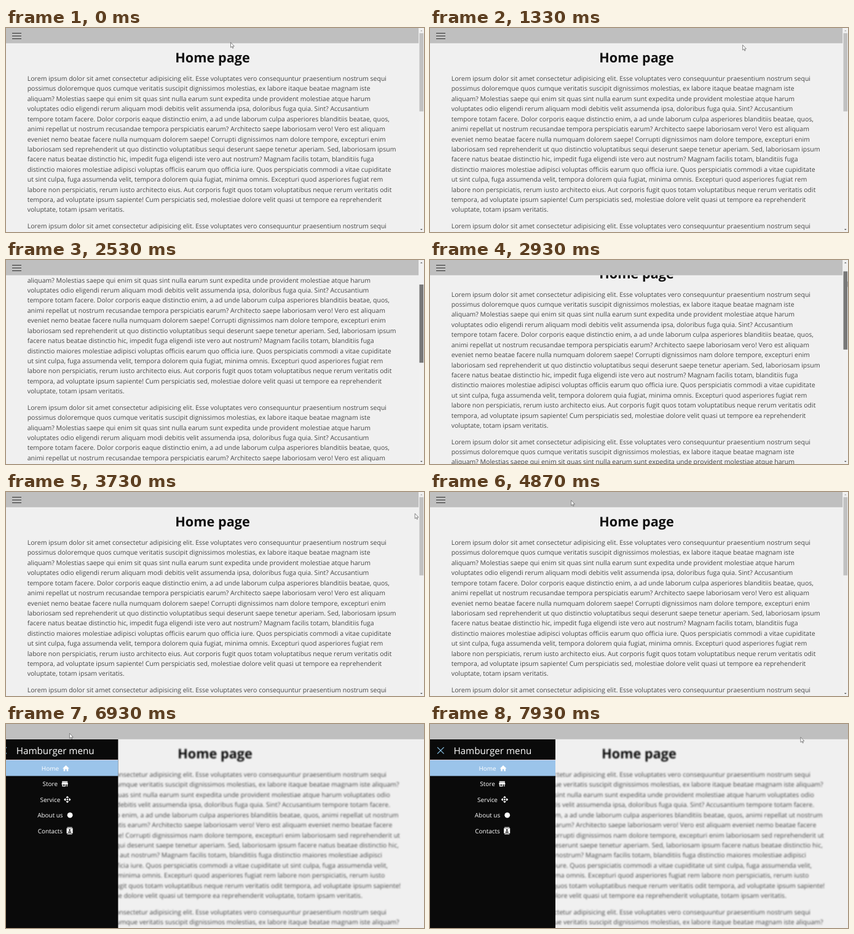
Write an HTML page that moves like this. It is 680 by 332 pixels and loops after 8 s.

```html
<!DOCTYPE html>
<html lang="en">
<head>
<meta charset="utf-8">
<title>Hamburger menu</title>
<style>
  html, body { margin: 0; width: 100%; height: 100%; overflow: hidden; background: #f0f0f0; }
  svg { display: block; width: 680px; height: 332px; }
  text { font-family: "Open Sans", "Noto Sans", sans-serif; font-kerning: none; text-rendering: geometricPrecision; }
  .copy { font-size: 10.5px; fill: #464646; }
  .head { font-size: 21.7px; font-weight: 700; fill: #111; text-anchor: middle; }
  .menu text { fill: #fff; font-size: 9.95px; }
  .menu .title { font-size: 15.2px; }
</style>
</head>
<body>
<svg viewBox="0 0 680 332">
  <defs>
    <filter id="soft" filterUnits="userSpaceOnUse" x="0" y="-10" width="690" height="360">
      <feGaussianBlur id="blur" stdDeviation="0"/>
    </filter>
  </defs>
  <rect width="680" height="332" fill="#f0f0f0"/>
  <g id="narrow"></g>
  <g id="wide" filter="url(#soft)"></g>
  <rect id="bar" height="24.8" fill="#bfbfbf"/>
  <path id="burger" d="M10 8.5h15m-15 4.5h15m-15 4.5h15" fill="none"/>

  <g id="scroll">
    <rect x="671.4" width="8.6" height="332" fill="#f1f1f1"/>
    <rect id="thumb" x="672.5" width="6.6" height="127.3"/>
    <path id="up" d="M674 5.3l1.8-1.9 1.8 1.9z"/>
    <path d="M674 327l1.8 1.9 1.8-1.9z" fill="#505050"/>
  </g>

  <g id="menu" class="menu">
    <rect y="25" width="204" height="307" fill="#0a0a0a"/>
    <path d="M12 37.8l10.6 10.6m0-10.6l-10.6 10.6" stroke="#8cc6ea" stroke-width="1.2"/>
    <text class="title" x="38.4" y="48.5">Hamburger menu</text>
    <rect y="58" width="204" height="1" fill="#d2c4cc"/>
    <rect y="59" width="204" height="25.6" fill="#9bc4ea"/>
    <g id="items"></g>
  </g>

  <g id="cursor" fill="#fff" stroke="#555" stroke-width=".7" stroke-linejoin="round">
    <path id="arrow" d="M0 0v8.3l1.9-1.7 1.3 2.9 1.2-.5-1.2-2.8h2.6z"/>
    <path id="hand" d="M-.9 5.6V.7a.9 .9 0 0 1 1.8 0v3.1l4 .9q1.1 .3 1 1.5l-1.3 5.6H.6l-3.3-4.4q-.6-1.3 .5-1.4z"/>
    <path id="beam" d="M-1.6-4h3.2M0-4v8M-1.6 4h3.2" stroke="#333"/>
  </g>
</svg>
<script>
const $ = id => document.getElementById(id);
const LOOP = 8000, FPS = 15, LINE = 16.42, GAP = 10.05;
const CLICK = 6725, HOVER = 5900;

// "|" breaks the line beside the scrollbar, "/" breaks it at full width.
const copy = `Lorem ipsum dolor sit amet consectetur adipisicing elit. Esse voluptates vero consequuntur praesentium nostrum sequi |/
possimus doloremque quos cumque veritatis suscipit dignissimos molestias, ex labore itaque beatae magnam iste |
aliquam? / Molestias saepe qui enim sit quas sint nulla earum sunt expedita unde provident molestiae atque harum |
voluptates odio / eligendi rerum aliquam modi debitis velit assumenda ipsa, doloribus fuga quia. Sint? Accusantium |
tempore totam facere. / Dolor corporis eaque distinctio enim, a ad unde laborum culpa asperiores blanditiis beatae, quos, |
animi repellat ut nostrum / recusandae tempora perspiciatis earum? Architecto saepe laboriosam vero! Vero est aliquam |
eveniet nemo beatae facere / nulla numquam dolorem saepe! Corrupti dignissimos nam dolore tempore, excepturi enim |
laboriosam sed reprehenderit ut / quo distinctio voluptatibus sequi deserunt saepe tenetur aperiam. Sed, laboriosam ipsum |
facere natus beatae distinctio hic, / impedit fuga eligendi iste vero aut nostrum? Magnam facilis totam, blanditiis fuga |
distinctio maiores molestiae adipisci / voluptas officiis earum quo officia iure. Quos perspiciatis commodi a vitae cupiditate |
ut sint culpa, fuga assumenda velit, / tempora dolorem quia fugiat, minima omnis. Excepturi quod asperiores fugiat rem |
labore non perspiciatis, rerum iusto / architecto eius. Aut corporis fugit quos totam voluptatibus neque rerum veritatis odit |
tempora, ad voluptate ipsum sapiente! / Cum perspiciatis sed, molestiae dolore velit quasi ut tempore ea reprehenderit |
voluptate, totam ipsam veritatis.`;

function page(mark, other, center) {
  const lines = copy.split(mark).map(s => s.replaceAll(other, '').replace(/\s+/g, ' ').trim());
  let out = `<text class="head" x="${center}" y="55.9">Home page</text>`;
  for (let p = 0, y = 86; p < 3; p++, y += GAP)
    for (const line of lines) {
      out += `<text class="copy" x="34.7" y="${y.toFixed(2)}">${line}</text>`;
      y += LINE;
    }
  return out;
}
$('narrow').innerHTML = page('|', '/', 336);
$('wide').innerHTML = page('/', '|', 340);

const icons = {
  'Home': '<path d="M-5.5 .5L0-4.8 5.5 .5H3.8V4.8H1.2V1.5H-1.2V4.8H-3.8V.5z"/>',
  'Store': '<path d="M-4.5-4.5h9v1.2h-9zM-4.5-2.7h9l.8 3.5h-10.6zM-4.3 0h5.6v4.4h-5.6zM3 0h1.2v4.4h-1.2z"/><path d="M-3 1h3v2h-3z" fill="#0a0a0a"/>',
  'Service': '<path d="M0-4.3L4.3 0 0 4.3-4.3 0z" fill="none" stroke="#fff" stroke-width="2" stroke-dasharray="4.4 1.68" stroke-dashoffset="2.2"/><circle r="1.3"/>',
  'About us': '<circle r="4.4"/>',
  'Contacts': '<path d="M-5-4.2h10v8.4h-10zM-4-6h8v1h-8zM-4 5h8v1h-8z"/><path d="M-2.8 3q0-2 2.8-2t2.8 2z" fill="#0a0a0a"/><circle cy="-1.2" r="1.4" fill="#0a0a0a"/>'
};
$('items').innerHTML = Object.entries(icons).map(([label, icon], i) =>
  `<g transform="translate(102 ${72 + i * 25.45})" fill="#fff"><text y="3.9">${label}</text><g>${icon}</g></g>`
).join('');

// Each row, label plus icon, is centred in the menu.
for (const row of $('items').children) {
  const [label, icon] = row.children;
  const width = label.getComputedTextLength();
  label.setAttribute('x', -(width + 17) / 2);
  icon.setAttribute('transform', `translate(${(width + 6) / 2} 0)`);
}

// Where the pointer turns: time, x, y.
const path = [
  [0, 365.5, 23.5], [470, 267, 58], [930, 307, 44], [1670, 677, 14],
  [2200, 677.5, 20], [2530, 681, 45], [3330, 679, 26], [3730, 665.5, 35],
  [3930, 652, 33], [4130, 670, 28], [5000, 150, 11], [5900, 17.5, 11.5],
  [6730, 17.5, 11.5], [7600, 385, 27], [7930, 603, 21.5]
];

function pointer(t) {
  const i = path.findIndex(k => k[0] > t);
  if (i < 0) return path[path.length - 1].slice(1);
  const [t0, x0, y0] = path[i - 1], [t1, x1, y1] = path[i];
  const f = (t - t0) / (t1 - t0);
  return [x0 + (x1 - x0) * f, y0 + (y1 - y0) * f];
}
const clamp = x => Math.min(1, Math.max(0, x));
const ease = x => x * x * (3 - 2 * x);
const between = (x, a, b) => x >= a && x < b;
const show = (id, on) => { $(id).style.display = on ? '' : 'none'; };
const set = (id, name, value) => $(id).setAttribute(name, value);

function draw(t) {
  const open = t >= CLICK;
  const slide = ease(clamp((t - CLICK + 55) / 330));
  const offset = 98.4 * Math.sin(Math.PI * clamp((t - 2214) / 870)) ** 2;
  const [x, y] = pointer(t);

  for (const id of ['narrow', 'scroll', 'burger']) show(id, !open);
  for (const id of ['wide', 'menu']) show(id, open);

  set('narrow', 'transform', `translate(0 ${-offset})`);
  set('bar', 'width', open ? 680 : 671.4);
  set('blur', 'stdDeviation', .9 * slide);
  set('menu', 'transform', `translate(${204 * (slide - 1)} 0)`);

  const drag = between(t, 2230, 3300);
  set('thumb', 'y', 8.4 + offset * .383);
  set('thumb', 'fill', drag ? '#787878' : x >= 671 ? '#a8a8a8' : '#c1c1c1');
  set('up', 'fill', offset > .1 ? '#505050' : '#a3a3a3');

  const lit = t >= HOVER;
  set('burger', 'stroke', lit ? '#e6e6fa' : '#2a2a2a');
  set('burger', 'stroke-width', lit ? 1.3 : 1);

  const hand = between(t, HOVER, CLICK);
  const beam = between(x, 276, 397) && between(y, 36, 62);
  show('hand', hand);
  show('beam', beam);
  show('arrow', !hand && !beam);
  set('cursor', 'transform', `translate(${x} ${y})`);
}

// Like a screen recording, motion advances in 15 steps a second.
const start = performance.now();
function tick() {
  const t = (performance.now() - start) % LOOP;
  draw(Math.floor((t + 5) * FPS / 1000) * 1000 / FPS % LOOP);
  requestAnimationFrame(tick);
}
draw(0);
requestAnimationFrame(tick);
</script>
</body>
</html>
```
